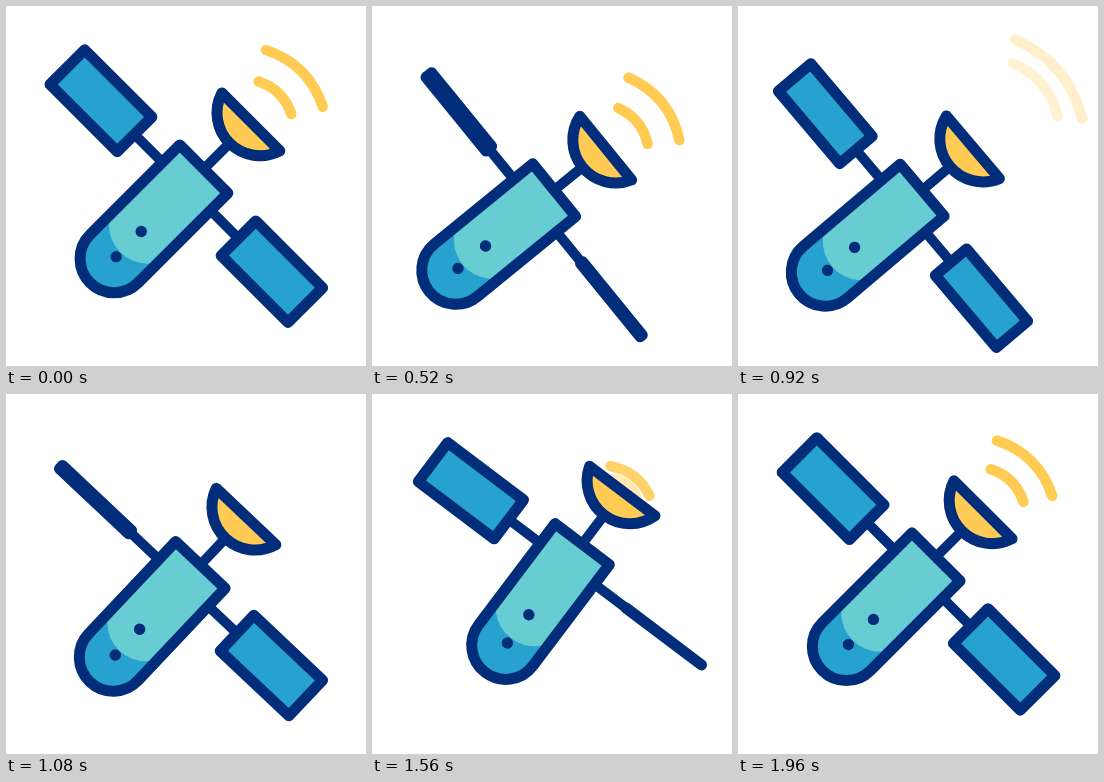
Animation of 360x360 px, one loop 2000 ms. Source, as an HTML page:

```html
<!DOCTYPE html>
<html lang="en">
<head>
<meta charset="utf-8">
<title>Satellite</title>
<style>
  html, body { margin: 0; width: 100%; height: 100%; overflow: hidden; background: #fff; }
  svg { display: block; width: 100vw; height: 100vh; }
  .line { stroke: #022d7a; stroke-width: 11; stroke-linecap: round; stroke-linejoin: round; }
  .rod { stroke-width: 10; }
  .wave { fill: none; stroke: #ffcb52; stroke-width: 10.5; stroke-linecap: round; }
</style>
</head>
<body>
<svg viewBox="0 0 360 360">
  <defs>
    <path id="hull" d="M-34-24.5H34V102.4A34 34 0 0 1-34 102.4Z"/>
    <clipPath id="inside"><use href="#hull"/></clipPath>
  </defs>
  <g id="satellite">
    <path class="wave" id="outer"/>
    <path class="wave" id="inner"/>
    <path class="line rod" fill="none" d="M-73 0H73M0-24.5V-60"/>
    <path class="line" id="left" fill="#27a2cf"/>
    <path class="line" id="right" fill="#27a2cf"/>
    <use href="#hull" fill="#27a2cf"/>
    <path clip-path="url(#inside)" fill="#68cdd2" d="M-39-30H39V54.5A39 39 0 0 1-39 54.5Z"/>
    <use href="#hull" class="line" fill="none"/>
    <g fill="#022d7a"><circle cy="64" r="5.7"/><circle cy="99.5" r="5.7"/></g>
    <path class="line" fill="#ffcb55" d="M-41-91H41A43 43 0 0 1-41-91Z"/>
  </g>
</svg>
<script>
const LOOP = 2000, STEP = 40;
const el = id => document.getElementById(id);
const linear = p => p;
const sine = p => (1 - Math.cos(Math.PI * p)) / 2;
const cubic = p => p < 0.5 ? 4 * p ** 3 : 1 - 4 * (1 - p) ** 3;

// Value at time t along [time, value] keys.
function track(t, keys, ease = sine) {
  if (t <= keys[0][0]) return keys[0][1];
  for (let i = 1; i < keys.length; i++) {
    const [t0, a] = keys[i - 1], [t1, b] = keys[i];
    if (t <= t1) return a + (b - a) * ease((t - t0) / (t1 - t0));
  }
  return keys[keys.length - 1][1];
}

// A panel turns edge-on and back twice.
function drawPanel(id, x0, x1, t, start, half) {
  const keys = [0, 1, 2, 3, 4].map(i => [start + i * half, i % 2 ? 0 : 24.5]);
  const h = track(t, keys, cubic);
  el(id).setAttribute("d", `M${x0} ${-h}H${x1}V${h}H${x0}Z`);
}

function drawWave(id, t, w) {
  const leaving = t < 1200;
  const [distance, half, shift] = [0, 1, 2].map(i => leaving
    ? track(t, [[480, w.rest[i]], [960, w.far[i]]])
    : track(t, [[w.from, w.near[i]], [w.to, w.rest[i]]], linear));
  const alpha = leaving
    ? track(t, [[w.fade, 1], [w.fade + 260, 0]], linear)
    : track(t, [[w.from, 0], [w.from + 135, 1]], linear);
  el(id).setAttribute("d",
    `M${shift - half} ${-distance}Q${shift} ${-distance - half / 2} ${shift + half} ${-distance}`);
  el(id).setAttribute("opacity", alpha);
}

// Each pose is [distance, half width, sideways shift].
const waves = {
  outer: { near: [90.5, 20.3, 0], rest: [152.6, 40, 0], far: [193.5, 52, -3], from: 1445, to: 1985, fade: 740 },
  inner: { near: [90.5, 12, 0], rest: [125.2, 23, 0], far: [176.5, 35, -4], from: 1500, to: 1920, fade: 725 }
};

function draw(t) {
  const drift = track(t, [[0, 0], [740, 32.5], [1450, -20], [2000, 0]]) * Math.SQRT1_2;
  const sway = track(t, [[0, 0], [1320, 4.2], [2000, 0]]) * Math.SQRT1_2;
  const angle = track(t, [[145, 45], [730, 53.2], [1390, 35.2], [1980, 45]]);
  el("satellite").setAttribute("transform",
    `translate(${180.5 - drift + sway} ${180.3 + drift + sway}) rotate(${angle})`);
  drawPanel("left", -168.5, -73.5, t, -20, 405);
  drawPanel("right", 73.5, 168, t, 180, 447);
  for (const id in waves) drawWave(id, t, waves[id]);
}

const begin = performance.now();
function tick() {
  const t = (performance.now() - begin) % LOOP;
  draw(Math.floor(t / STEP) * STEP);
  requestAnimationFrame(tick);
}
tick();
</script>
</body>
</html>
```
